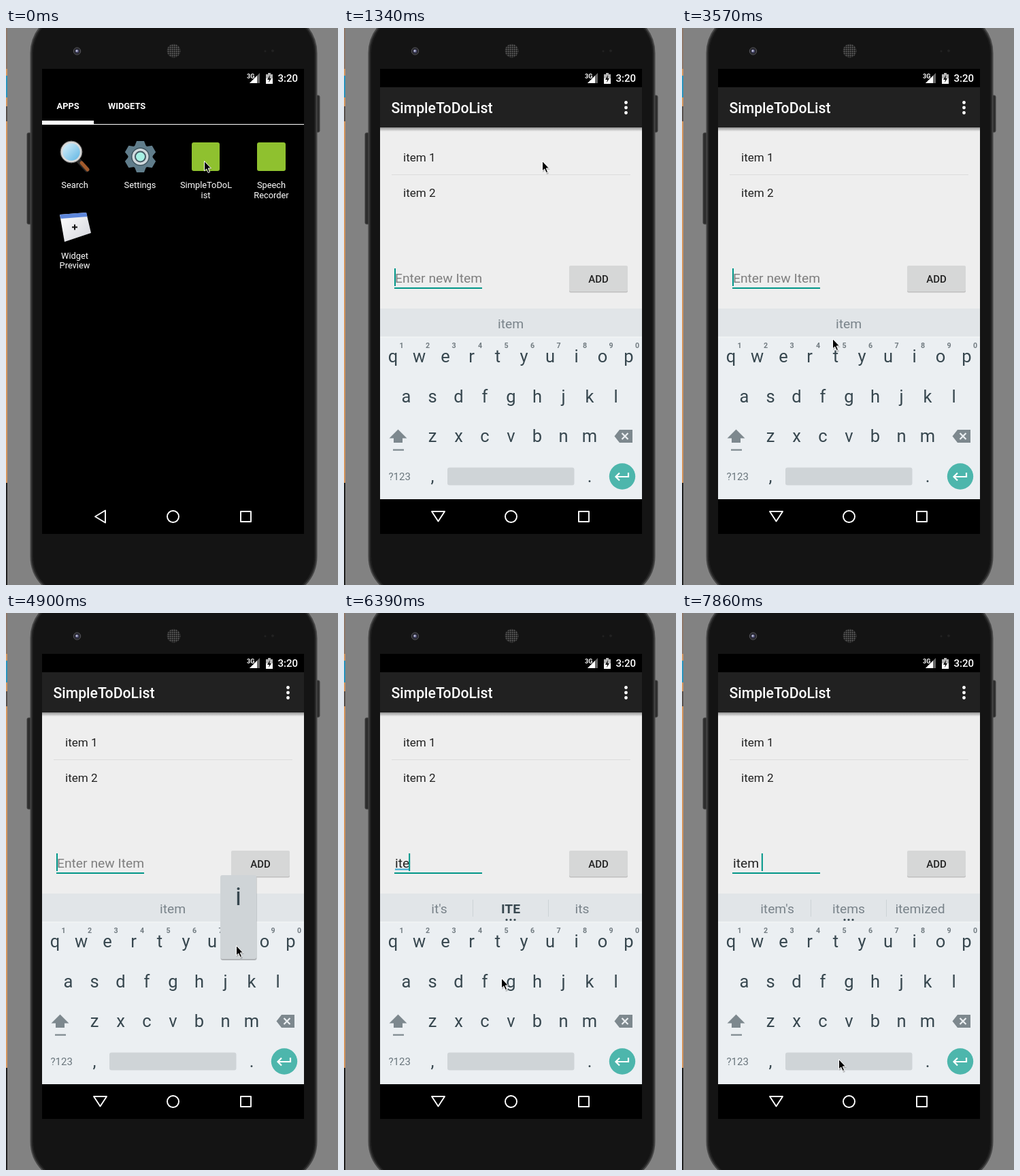
An HTML page for the animation above (8 s loop, 488 px wide and 818 px high).

```html
<!DOCTYPE html>
<html lang="en">
<head>
<meta charset="utf-8">
<title>To-do list demo</title>
<style>
  html, body { margin: 0; width: 100%; height: 100%; overflow: hidden; background: #828282; }
  svg { display: block; width: 488px; height: 818px; }
  text { font-family: Roboto, "Noto Sans", sans-serif; white-space: pre; }
  .mid { text-anchor: middle; }
  .label { font-size: 12.83px; fill: #fff; }
  .tab { font-size: 12.83px; font-weight: 700; fill: #fff; }
  .row { font-size: 17.1px; fill: #212121; }
  .field { font-size: 19.25px; }
  .key { font-size: 25.5px; fill: #37474f; }
  .hint { font-size: 10.7px; font-weight: 700; fill: #727c82; }
  .word { font-size: 19.25px; fill: #79838a; }
  .word.strong { font-weight: 700; fill: #37474f; }
  .nav { fill: none; stroke: #fff; stroke-width: 1.9; stroke-linejoin: round; }
</style>
</head>
<body>
<svg viewBox="0 0 488 818">
  <defs>
    <linearGradient id="wall" gradientUnits="userSpaceOnUse" x1="58" y1="690" x2="435" y2="745">
      <stop offset="0" stop-color="#150c0c"/>
      <stop offset=".13" stop-color="#4d2a1f"/>
      <stop offset=".25" stop-color="#4a2430"/>
      <stop offset=".42" stop-color="#73404e"/>
      <stop offset=".68" stop-color="#8d4f5e"/>
      <stop offset=".92" stop-color="#77485a"/>
      <stop offset="1" stop-color="#59665f"/>
    </linearGradient>
    <linearGradient id="shade" x2="0" y2="1">
      <stop offset="0" stop-opacity=".38"/>
      <stop offset="1" stop-opacity="0"/>
    </linearGradient>
    <linearGradient id="lensFill" x2="1" y2="1">
      <stop offset="0" stop-color="#e2f4fc"/>
      <stop offset="1" stop-color="#58b2e2"/>
    </linearGradient>
    <linearGradient id="pane" x2="1" y2="1">
      <stop offset="0" stop-color="#fff"/>
      <stop offset="1" stop-color="#d3d5dc"/>
    </linearGradient>
    <pattern id="mesh" width="3" height="3" patternUnits="userSpaceOnUse">
      <rect width="3" height="3" fill="#1c1c1c"/>
      <circle cx="1.5" cy="1.5" r="1" fill="#686868"/>
    </pattern>
    <clipPath id="screen"><rect x="53" y="60" width="385" height="632"/></clipPath>
  </defs>

  <!-- desktop and phone body -->
  <rect width="488" height="818" fill="#828282"/>
  <rect width="2" height="818" fill="#d5965f"/>
  <rect width="2" height="60" fill="#8d7768"/>
  <rect y="70" width="2" height="32" fill="#2a93bd"/>
  <rect y="115" width="2" height="22" fill="#59514d"/>
  <rect y="668" width="2" height="150" fill="#202020"/>
  <rect x="31" y="154" width="7" height="134" rx="2" fill="#2d2d2d" stroke="#454545"/>
  <rect x="455" y="99" width="6" height="54" rx="2" fill="#2d2d2d" stroke="#454545"/>
  <rect x="36.500" y="-23" width="420" height="859" rx="60" fill="#242424" stroke="#454545" stroke-width="2"/>
  <rect x="39.500" y="-20" width="414" height="853" rx="57" fill="#141414" stroke="#1d1d1d"/>
  <circle cx="104.500" cy="34" r="5.200" fill="#26262a" stroke="#55555a"/>
  <circle cx="104.500" cy="34" r="2.800" fill="#45456a"/>
  <circle cx="104" cy="33.500" r="1.500" fill="#c0c2d8"/>
  <circle cx="246.500" cy="33.500" r="10" fill="url(#mesh)"/>
  <circle cx="381" cy="34" r="1.500" fill="#222"/>
  <circle cx="392" cy="33.500" r="2" fill="#222"/>
  <rect x="53" y="60" width="385" height="683"/>

  <g id="launcher">
    <rect id="tint" x="53" y="60" width="385" height="27" fill="#03191e"/>
    <text class="tab" x="74.500" y="119">APPS</text>
    <text class="tab" x="150" y="119">WIDGETS</text>
    <path d="M53 141.500H438" stroke="#fff"/>
    <rect x="53" y="136" width="76" height="6" fill="#fff"/>
    <path d="M106 194L119 208" stroke="#2b2b2b" stroke-width="7" stroke-linecap="round"/>
    <path d="M111 198L120 208" stroke="#a35a2b" stroke-width="5" stroke-linecap="round"/>
    <circle cx="96" cy="182" r="14.200" fill="url(#lensFill)" stroke="#d9d9d9" stroke-width="3"/>
    <circle cx="96" cy="182" r="16" fill="none" stroke="#777"/>
    <g id="gear" transform="translate(197.500 189)"></g>
    <g id="target">
      <rect x="273" y="168" width="41" height="42" rx="3" fill="#8fc12f"/>
      <text class="label mid" x="294" y="235">SimpleToDoL</text>
      <text class="label mid" x="293.500" y="249.500">ist</text>
    </g>
    <rect x="369" y="168" width="42" height="42" rx="3" fill="#8fc12f"/>
    <path d="M79 274L118 271L125 301L86 314Z" fill="url(#pane)"/>
    <path d="M79 274L118 271L119.500 277L80.500 280Z" fill="#5d86da"/>
    <path d="M97 292.500H105M101 288.500V296.500" stroke="#111" stroke-width="2"/>
    <g class="mid">
      <text class="label" x="101" y="235">Search</text>
      <text class="label" x="197" y="235">Settings</text>
      <text class="label" x="390" y="235">Speech</text>
      <text class="label" x="390" y="249.500">Recorder</text>
      <text class="label" x="101" y="338.500">Widget</text>
      <text class="label" x="101" y="353">Preview</text>
    </g>
  </g>

  <g id="app">
    <rect x="53" y="60" width="385" height="632" fill="#eee"/>
    <rect x="53" y="60" width="385" height="27"/>
    <rect x="53" y="87" width="385" height="59" fill="#212121"/>
    <rect x="53" y="146" width="385" height="6" fill="url(#shade)"/>
    <text x="69.500" y="125" font-size="21.200" font-weight="500" fill="#fff">SimpleToDoList</text>
    <g fill="#fff"><circle cx="414.500" cy="109.500" r="2.400"/><circle cx="414.500" cy="117" r="2.400"/><circle cx="414.500" cy="124.500" r="2.400"/></g>
    <text class="row" x="87" y="195.500">item 1</text>
    <text class="row" x="87" y="247.500">item 2</text>
    <path d="M70 215.500H421" stroke="#dcdcdc"/>
    <path id="lastLine" d="M70 267.500H421" stroke="#d2d2d2"/>
    <g id="entry">
      <text id="hint" class="field" x="75" y="374" fill="#7e7e7e">Enter new Item</text>
      <text id="typed" class="field" x="75" y="374" fill="#212121"></text>
      <rect id="composing" x="75" y="375.500" height="2" fill="#38a9d4"/>
      <rect x="74" y="381" width="129" height="2" fill="#009688"/>
      <rect id="caret" x="74" y="353" width="2" height="26" fill="#009688"/>
      <rect x="331" y="350" width="86" height="38.500" rx="2" opacity=".2"/>
      <rect x="331" y="349" width="86" height="38" rx="2" fill="#d6d7d7"/>
      <text class="mid" x="374" y="374" font-size="15" font-weight="500" fill="#212121">ADD</text>
    </g>
  </g>

  <g clip-path="url(#screen)">
    <g id="keyboard">
      <rect x="53" y="412" width="385" height="42" fill="#e1e5e8"/>
      <rect x="53" y="453.500" width="385" height="238.500" fill="#ebeff2"/>
      <path d="M53 454H438" stroke="#f5f7f8"/>
      <g id="words" class="mid"></g>
      <g id="extras">
        <path d="M189.500 421V446M300.500 421V446" stroke="#cdd3d6"/>
        <g fill="#37474f"><circle cx="239" cy="450.500" r="1.600"/><circle cx="245" cy="450.500" r="1.600"/><circle cx="251" cy="450.500" r="1.600"/></g>
      </g>
      <g id="keys" class="mid"></g>
      <g fill="#7d888e">
        <path d="M79.500 589.500L92.500 602.500H86V609H73V602.500H66.500Z"/>
        <rect x="72" y="618.500" width="16" height="2.200"/>
        <path d="M405 590H424V609H405L397.500 599.500Z"/>
      </g>
      <path d="M408.500 595L417.500 604M417.500 595L408.500 604" stroke="#ebeff2" stroke-width="2.200"/>
      <text x="65.500" y="664" font-size="15" fill="#6a767d">?123</text>
      <rect id="space" x="152" y="645.500" width="186.500" height="26" rx="3" fill="#cfd4d7"/>
      <circle cx="409" cy="658.500" r="19.200" fill="#4db6ac"/>
      <path d="M418 653V659H400M405 653.500L399.500 659L405 664.500" fill="none" stroke="#fff" stroke-width="2.200"/>
      <g id="popup">
        <rect x="-26" y="-96" width="53" height="123" rx="3" opacity=".25"/>
        <rect x="-26.500" y="-98" width="53" height="123" rx="3" fill="#cfd4d7"/>
        <text id="popupChar" class="mid" y="-54" font-size="37" fill="#37474f"></text>
      </g>
    </g>
  </g>

  <!-- status icons and navigation -->
  <g fill="#fff">
    <text x="354" y="73.500" font-size="9" font-weight="700">3G</text>
    <path d="M373 66V81H358Z" fill="#666"/>
    <path d="M369 70V81H358Z"/>
    <path d="M385 66H389V68H392V82H382V68H385Z" fill="#b5b5b5"/>
    <path d="M382 74H392V82H382Z"/>
    <path d="M388 69L384 76H387L386 80.500L390 74H387.500Z" fill="#111"/>
    <text x="399.500" y="79" font-size="15" font-weight="500">3:20</text>
  </g>
  <rect id="navWall" x="53" y="692" width="385" height="51" fill="url(#wall)"/>
  <path id="back" class="nav"/>
  <circle class="nav" cx="245.500" cy="717.500" r="8.500"/>
  <rect class="nav" x="345" y="710" width="15" height="15"/>

  <g id="pointer">
    <path d="M1 2V17L4.500 14L7 20L10 19L7.500 13H12Z" opacity=".2"/>
    <path d="M.5 .5V15L3.700 12L6.200 17.500L8.600 16.500L6.200 11H10.500Z" fill="#000" stroke="#fff" stroke-width="1"/>
  </g>
</svg>

<script>
const LOOP = 8000, TICK = 148.3;
const $ = id => document.getElementById(id);
const show = (id, on) => $(id).setAttribute('display', on ? 'inline' : 'none');
const set = (id, attr, value) => $(id).setAttribute(attr, value);

function add(parent, tag, attrs, content = '') {
  const el = document.createElementNS('http://www.w3.org/2000/svg', tag);
  for (const name in attrs) el.setAttribute(name, attrs[name]);
  el.textContent = content;
  $(parent).append(el);
  return el;
}

// Settings icon
for (let i = 0; i < 6; i++)
  add('gear', 'path', { d: 'M-9-14L-5.500-23H5.500L9-14Z', fill: '#607d8b', transform: `rotate(${i * 60})` });
[[18, '#607d8b'], [13.5, '#3f555f'], [12, '#cfd8dc'], [8.5, '#455a64'], [6.5, '#a7f1e4']]
  .forEach(([r, fill]) => add('gear', 'circle', { r, fill }));

// Letter keys, with their centres kept for the popup
const PITCH = 38.5, centre = {};
[['qwertyuiop', 72, 483], ['asdfghjkl', 91.5, 541.5], ['zxcvbnm', 130, 600]].forEach(([row, x0, y]) =>
  [...row].forEach((char, i) => {
    const x = x0 + PITCH * i;
    centre[char] = [x, y];
    add('keys', 'text', { class: 'key', x, y: y + 8 }, char);
    if (y === 483) add('keys', 'text', { class: 'hint', x: x + 12.5, y: 470 }, String((i + 1) % 10));
  }));
add('keys', 'text', { class: 'key', x: 130, y: 667 }, ',');
add('keys', 'text', { class: 'key', x: 361, y: 667 }, '.');
const words = [140, 245, 350].map(x => add('words', 'text', { class: 'word', x, y: 440.5 }));

// Tracks: each entry starts at a tick
const path = [
  [0, 291, 195], [12, 291, 195], [14, 291, 215], [15, 291, 215], [16, 294, 240],
  [18, 276, 335], [20, 235, 418], [21, 235, 418], [24, 221, 456], [25, 221, 456],
  [26, 224, 468], [28, 275, 511], [30, 334, 496], [31, 338, 488], [34, 338, 488],
  [36, 228, 487], [37, 226, 486], [39, 158, 485], [41, 153, 487],
  [44, 270, 560], [46, 357, 603], [47, 356, 604], [48, 330, 612],
  [50, 252, 648], [51, 232, 655], [53, 230, 655]
];
const typing = [[0, ''], [34, 'i'], [37, 'it'], [41, 'ite'], [48, 'item'], [53, 'item ']];
const pressed = [[0, ''], [33, 'i'], [34, ''], [36, 't'], [37, ''], [40, 'e'], [41, ''], [47, 'm'], [49, '']];
const hints = [
  [0, ' item '], [34, 'in I is'], [40, "it's it its"], [42, "it's ITE its"],
  [49, "item's item items"], [53, "item's items itemized"]
];
const caretOff = [[7, 9], [13, 16], [19, 22], [26, 29], [31, 33]];

const at = (track, tick) => track.findLast(step => step[0] <= tick)[1];

function pointerAt(tick) {
  const i = path.findLastIndex(p => p[0] <= tick);
  const [t0, x0, y0] = path[i], [t1, x1, y1] = path[Math.min(i + 1, path.length - 1)];
  const k = t1 > t0 ? (tick - t0) / (t1 - t0) : 0;
  return `translate(${Math.round(x0 + (x1 - x0) * k)} ${Math.round(y0 + (y1 - y0) * k)})`;
}

function draw(tick) {
  const opening = tick === 4, open = tick >= 4, keyboard = tick >= 6, settled = tick >= 7;
  show('launcher', tick <= 4);
  show('tint', opening);
  set('target', 'opacity', tick >= 2 ? 0.6 : 1);
  show('app', open);
  set('app', 'transform', opening ? 'translate(79 73) scale(.898 .891) translate(-53 -60)' : '');
  show('lastLine', !settled);
  set('entry', 'transform', settled ? '' : 'translate(0 281)');
  show('keyboard', keyboard);
  set('keyboard', 'transform', settled ? '' : 'translate(0 70)');
  show('navWall', opening);
  set('back', 'd', open ? 'M129 710H148L138.500 724.500Z' : 'M131 717.500L146 708.500V726.500Z');

  const text = at(typing, tick);
  $('typed').textContent = text;
  const width = text && open ? $('typed').getComputedTextLength() : 0;
  show('hint', !text);
  set('composing', 'width', text.endsWith(' ') ? 0 : width);
  set('caret', 'x', 74 + width);
  show('caret', !caretOff.some(([from, to]) => tick >= from && tick < to));

  at(hints, tick).split(' ').forEach((word, i) => words[i].textContent = word);
  words[1].classList.toggle('strong', tick >= 34 && tick < 53);
  show('extras', tick >= 34);
  set('space', 'fill', tick === 52 ? '#bcc3c7' : '#cfd4d7');

  const char = at(pressed, tick);
  show('popup', char);
  if (char) {
    set('popup', 'transform', `translate(${centre[char]})`);
    $('popupChar').textContent = char;
  }
  set('pointer', 'transform', pointerAt(tick));
}

const start = performance.now();
let last = -1;
function frame() {
  const tick = Math.floor(((performance.now() - start) % LOOP) / TICK);
  if (tick !== last) draw(last = tick);
  requestAnimationFrame(frame);
}
frame();
</script>
</body>
</html>
```
